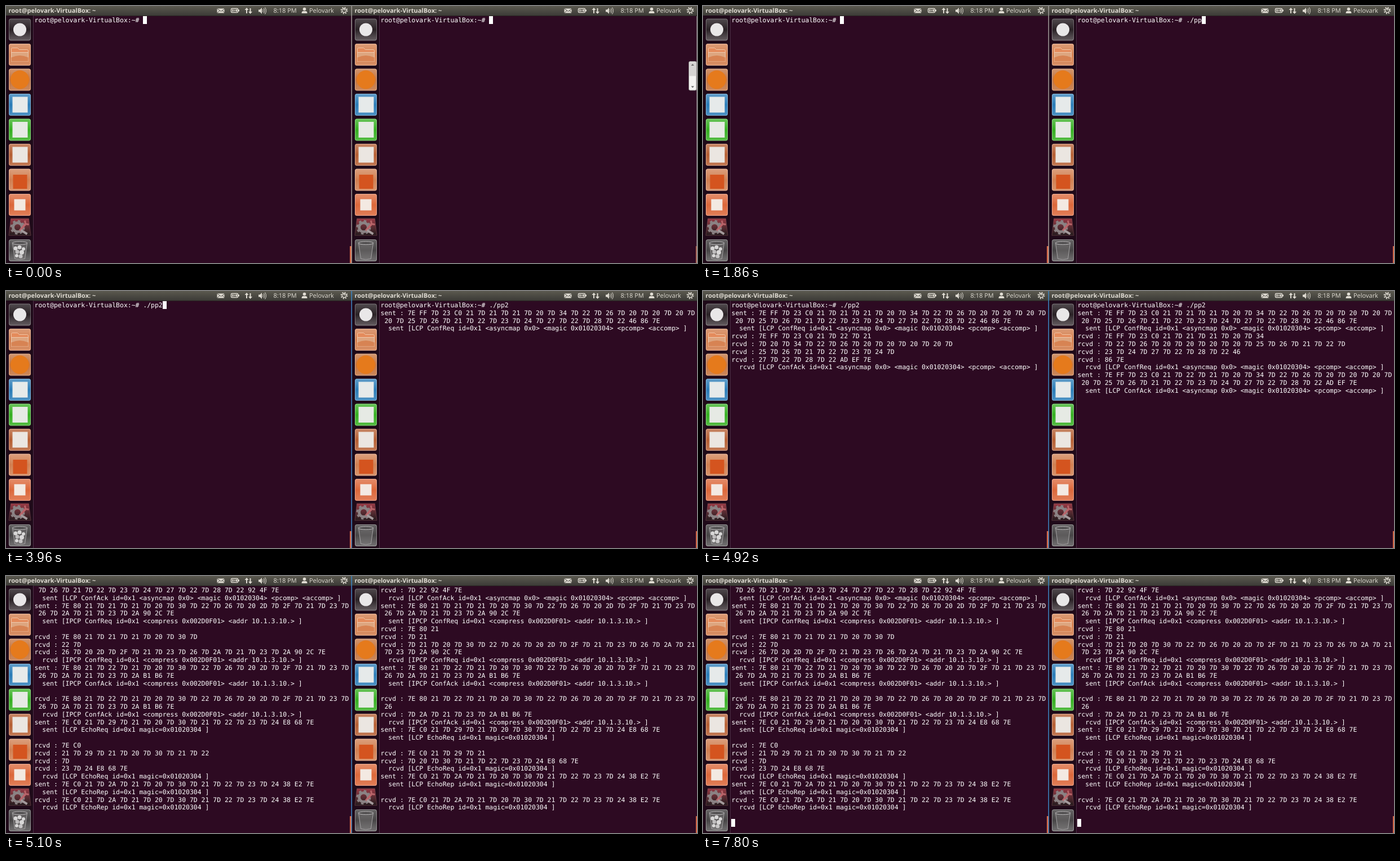
An HTML page that plays this animation: 1226 by 457 pixels, repeating every 8000 ms.

```html
<!DOCTYPE html>
<html lang="en">
<head>
<meta charset="utf-8">
<title>Two terminals</title>
<style>
  html, body { margin: 0; width: 1226px; height: 457px; overflow: hidden; background: #2d0a22; }
  body { position: relative; }
  svg { position: absolute; left: 0; top: 0; display: block; }
  svg text { font: 11px "Open Sans", "Noto Sans", sans-serif; fill: #dfdbd2; text-rendering: geometricPrecision; }
  svg .title { font-weight: 700; }
  pre {
    position: absolute; top: 19px; margin: 0; color: #fff;
    font: 11.44px/13.79px "DejaVu Sans Mono", monospace;
    text-rendering: geometricPrecision; font-variant-ligatures: none;
  }
  .cursor { position: absolute; width: 7px; height: 14px; background: #fff; }
  #thumb { animation: fade 8s steps(1) infinite; }
  @keyframes fade {
    0% { opacity: 1 }
    .75% { opacity: .8 }
    1.5% { opacity: .6 }
    2.25% { opacity: .4 }
    3% { opacity: .2 }
    6.75%, 100% { opacity: 0 }
  }
  #divider { animation: focus 8s steps(1) infinite; }
  @keyframes focus {
    0% { fill: #a09b98 }
    36.75%, 100% { fill: #3c86c4 }
  }
</style>
</head>
<body>
<svg width="1226" height="457" viewBox="0 0 1226 457">
  <defs>
    <linearGradient id="bar" x2="0" y2="1">
      <stop stop-color="#5b594f"/><stop offset="1" stop-color="#3c3b37"/>
    </linearGradient>
    <linearGradient id="dark" x2="0" y2="1">
      <stop stop-color="#231d20"/><stop offset=".5" stop-color="#2c2628"/><stop offset="1" stop-color="#575153"/>
    </linearGradient>
    <linearGradient id="steel" x2="0" y2="1">
      <stop stop-color="#343233"/><stop offset="1" stop-color="#5b595a"/>
    </linearGradient>
    <linearGradient id="fold" x2="0" y2="1">
      <stop stop-color="#9a3a45"/><stop offset=".55" stop-color="#542a30"/><stop offset="1" stop-color="#241a1d"/>
    </linearGradient>
    <linearGradient id="gloss" x2="0" y2="1">
      <stop stop-color="#fff" stop-opacity=".25"/><stop offset=".5" stop-color="#fff" stop-opacity="0"/>
      <stop offset="1" stop-color="#fff" stop-opacity=".15"/>
    </linearGradient>
    <g id="tile">
      <rect x=".5" y=".5" width="39" height="39" rx="3.5"/>
      <rect x="1" y="1" width="38" height="38" rx="3" fill="url(#gloss)" stroke="#fff" stroke-opacity=".38"/>
    </g>

    <g id="launcher">
      <rect y="17" width="48" height="440" fill="#1f0a19"/>
      <rect x="48" y="17" width="1" height="440" fill="#4d3046"/>
      <g transform="translate(4.5 22)">
        <use href="#tile" fill="url(#dark)" opacity=".85"/>
        <circle cx="20" cy="20" r="11.5" fill="#e9e7e8"/>
      </g>
      <g transform="translate(4.5 66.5)">
        <use href="#tile" fill="#d27d4c"/>
        <path d="M5 10q0-2 2-2h9l3 3h14q2 0 2 2v19H5z" fill="#e48b5c" stroke="#f3c6a6"/>
        <path d="M5 16h30v16H5z" fill="#dda57f" stroke="#efc9ae"/>
        <path d="M5 25q15-7 30 0v7H5z" fill="#d78353"/>
      </g>
      <g transform="translate(4.5 111)">
        <use href="#tile" fill="#c4743f"/>
        <circle cx="20" cy="20" r="16.5" fill="#e57a1c"/>
      </g>
      <g transform="translate(4.5 155.5)">
        <use href="#tile" fill="#2b7db8"/>
        <path d="M7 6h27v28H7z" fill="#e6eaea"/>
      </g>
      <g transform="translate(4.5 200)">
        <use href="#tile" fill="#35b021"/>
        <path d="M7 6h27v28H7z" fill="#e6eae4"/>
      </g>
      <g transform="translate(4.5 244.5)">
        <use href="#tile" fill="#b65f33"/>
        <path d="M7 6h27v28H7z" fill="#ebe6e1"/>
      </g>
      <g transform="translate(4.5 289)">
        <use href="#tile" fill="#d18052"/>
        <path d="M8 11h25v25H8z" fill="#d4541f"/>
      </g>
      <g transform="translate(4.5 333.5)">
        <use href="#tile" fill="#dc683b"/>
        <path d="M10 10h20v20H10z" fill="#f3e9e2"/>
      </g>
      <g transform="translate(4.5 377.5)">
        <path d="M4 .5h32l3.5 30h-39z" fill="url(#fold)" stroke="#7b4a50" stroke-opacity=".6"/>
        <circle cx="16" cy="16" r="8" fill="none" stroke="#8b8284" stroke-width="5"/>
        <circle cx="16" cy="16" r="11.5" fill="none" stroke="#8b8284" stroke-width="3" stroke-dasharray="4.5 4.53"/>
        <path d="M20 22L31 9" stroke="#b8656a" stroke-width="4"/>
        <path d="M29 4l1 6 6 1" fill="none" stroke="#b8656a" stroke-width="3"/>
        <path d="M22 21l11 7" stroke="#a49a9c" stroke-width="4"/>
      </g>
      <g transform="translate(4.5 414.5)">
        <use href="#tile" fill="url(#steel)"/>
        <path d="M7 7h26l-4 28q-9 3-18 0z" fill="#7c7a7b" fill-opacity=".4" stroke="#a5a3a4"/>
        <ellipse cx="20" cy="7" rx="13.5" ry="2.5" fill="#4b494a" stroke="#c5c3c4"/>
      </g>
    </g>

    <g id="tray" fill="#dfdbd2">
      <rect x="374.5" y="4.5" width="13" height="8" rx="1"/>
      <path d="M375 5l6.5 4.5L388 5M375 12l4-3.5m9 3.5l-4-3.5" fill="none" stroke="#4b4a44"/>
      <rect x="399.5" y="4.5" width="12" height="7" rx="1.5" fill="none" stroke="#dfdbd2" stroke-width="1.5"/>
      <path d="M412 6.500h2v3h-2zM401.500 6h2v4h-2zM408 6h2v4h-2zM407 5l-3 3.500h2l-1 2.500 3-3.500h-2z"/>
      <path d="M427 3l3.500 4h-2.500v6h-2V7h-2.500zM433.500 14l-3.500-4h2.500V4h2v6h2.500z"/>
      <path d="M448 6.500h2.500L454 3v11l-3.500-3.500H448z"/>
      <path d="M455.500 6q1.500 2.500 0 5m2-7q3 4.500 0 9m2-10.500q4 6 0 12" fill="none" stroke="#dfdbd2"/>
      <text x="474.500" y="12">8:18 PM</text>
      <circle cx="529.500" cy="5.500" r="2.800"/>
      <path d="M524.500 13q0-4 3-4h4q3 0 3 4z"/>
      <text x="538" y="12">Pelovark</text>
    </g>
    <g id="gear" fill="none" stroke="#dfdbd2">
      <circle cx="600" cy="8" r="3.500" stroke-width="1.400"/>
      <circle cx="600" cy="8" r="5.400" stroke-width="2" stroke-dasharray="2 2.240"/>
      <path d="M600 4v4" stroke-width="1.500"/>
    </g>
    <g id="desk">
      <rect width="613" height="17" fill="url(#bar)"/>
      <rect y="17" width="613" height="1" fill="#292422"/>
      <text class="title" x="4.500" y="12">root@pelovark-VirtualBox: ~</text>
      <use href="#launcher"/>
      <use href="#gear"/>
      <rect x="610" y="427" width="3" height="30" fill="#d76a48"/>
    </g>
  </defs>

  <use href="#desk"/>
  <use href="#tray"/>
  <g fill="#d9d8d8">
    <circle cx="17" cy="431" r="3.500"/><circle cx="24" cy="429" r="3.500"/><circle cx="31" cy="432" r="3"/>
    <circle cx="20" cy="437" r="3.500" fill="#bfbdbe"/><circle cx="28" cy="438" r="4"/>
    <circle cx="19" cy="444" r="3"/><circle cx="26" cy="445" r="3.500" fill="#c8c6c7"/>
  </g>
  <use href="#desk" x="614"/>
  <use href="#tray" x="616"/>
  <rect id="divider" x="612.500" width="1.500" height="457"/>
  <g id="thumb">
    <path d="M1225.500 18v439" stroke="#8a8085"/>
    <rect x="1211.500" y="98.500" width="13.500" height="51.500" rx="2.500" fill="#f3f2f1" stroke="#8c8888"/>
    <path d="M1212.500 99.500h12v25h-12z" fill="#d6d4d3"/>
    <path d="M1215.500 106l2.700-3 2.700 3zM1215.500 142.500l2.700 3 2.700-3z" fill="#666"/>
  </g>
</svg>

<script>
const LOOP = 8000, COLS = 81, ROWS = 30, CELL_W = 6.887, CELL_H = 13.79, TOP = 18.4;
const PROMPT = 'root@pelovark-VirtualBox:~# ', COMMAND = './pp2';

// Escaped PPP frames
const lcp = (code, crc, head = 'FF 7D 23 C0 21') =>
  `7E ${head} 7D ${code} 7D 21 7D 20 7D 34 7D 22 7D 26 7D 20 7D 20 7D 20 7D 20 7D 25 ` +
  `7D 26 7D 21 7D 22 7D 23 7D 24 7D 27 7D 22 7D 28 7D 22 ${crc} 7E`;
const ipcp = (code, crc) =>
  `7E 80 21 7D ${code} 7D 21 7D 20 7D 30 7D 22 7D 26 7D 20 2D 7D 2F 7D 21 7D 23 7D ` +
  `26 7D 2A 7D 21 7D 23 7D 2A ${crc} 7E`;
const echo = (code, crc) =>
  `7E C0 21 7D ${code} 7D 21 7D 20 7D 30 7D 21 7D 22 7D 23 7D 24 ${crc} 7E`;

const LCP_OPTS = 'id=0x1 <asyncmap 0x0> <magic 0x01020304> <pcomp> <accomp>';
const IP_OPTS = 'id=0x1 <compress 0x002D0F01> <addr 10.1.3.10.>';
const ECHO_OPTS = 'id=0x1 magic=0x01020304';
const PACKETS = {
  lcpReq: [lcp('21', '46 86'), 'LCP ConfReq ' + LCP_OPTS],
  lcpAck: [lcp('22', 'AD EF'), 'LCP ConfAck ' + LCP_OPTS],
  shortAck: [lcp('22', '92 4F', 'C0 21'), 'LCP ConfAck ' + LCP_OPTS],
  ipReq: [ipcp('21', '90 2C'), 'IPCP ConfReq ' + IP_OPTS],
  ipAck: [ipcp('22', 'B1 B6'), 'IPCP ConfAck ' + IP_OPTS],
  echoReq: [echo('29', 'E8 68'), 'LCP EchoReq ' + ECHO_OPTS],
  echoRep: [echo('2A', '38 E2'), 'LCP EchoRep ' + ECHO_OPTS],
};

// Log lines of one packet, read in chunks of the given byte counts
function packet(dir, name, sizes = [99]) {
  const [hex, info] = PACKETS[name], bytes = hex.split(' '), lines = [];
  for (const n of sizes) {
    const line = `${dir} : ${bytes.splice(0, n).join(' ')}`;
    for (let i = 0; i < line.length; i += COLS) lines.push(line.slice(i, i + COLS));
  }
  return [...lines, `  ${dir} [${info} ]`];
}
const sent = name => packet('sent', name);
const rcvd = (name, ...sizes) => packet('rcvd', name, sizes.length ? sizes : undefined);

const first = [PROMPT + COMMAND, ...sent('lcpReq')];
const leftStart = [...first, ...rcvd('lcpAck', 10, 17, 12, 10)];
const leftEnd = [
  ...leftStart, ...rcvd('lcpReq', 10, 18, 10, 9, 2), ...sent('shortAck'),
  ...sent('ipReq'), '', ...rcvd('ipReq', 12, 2, 23), ...sent('ipAck'), '',
  ...rcvd('ipAck'), ...sent('echoReq'), '', ...rcvd('echoReq', 2, 13, 1, 6),
  ...sent('echoRep'), ...rcvd('echoRep'), '',
];
const rightStart = [...first, ...rcvd('lcpReq', 14, 21, 12, 2), ...sent('lcpAck'), ''];
const rightEnd = [
  ...rightStart, ...rcvd('shortAck', 41, 5), ...sent('ipReq'),
  ...rcvd('ipReq', 3, 2, 32), ...sent('ipAck'), '', ...rcvd('ipAck', 26, 11),
  ...sent('echoReq'), '', ...rcvd('echoReq', 7, 15), ...sent('echoRep'), '',
  ...rcvd('echoRep'), '',
];

const panes = [
  {
    x: 50.5,
    keys: [3420, 3540, 3660, 3780, 3960],
    logs: [[4200, leftStart], [5040, leftEnd.slice(0, -7)], [5100, leftEnd]],
    blinks: [300, 840, 4740, 5280, 5880, 6480, 7020, 7620],
  },
  {
    x: 664.5,
    keys: [1380, 1500, 1680, 1800, 1920],
    logs: [[2100, first], [4200, rightStart], [5040, rightEnd]],
    blinks: [360, 960, 2640, 3240, 3780, 4380, 4920, 5520, 6120, 6660, 7260, 7800],
  },
];

const add = (tag, cls) => {
  const el = document.createElement(tag);
  el.className = cls;
  return document.body.appendChild(el);
};
for (const p of panes) {
  p.text = add('pre', 'log');
  p.text.style.left = p.x + 'px';
  p.cursor = add('div', 'cursor');
}

const passed = (times, t) => times.filter(at => at <= t).length;

function draw(p, t) {
  const step = passed(p.logs.map(l => l[0]), t);
  const typed = PROMPT + COMMAND.slice(0, passed(p.keys, t));
  const lines = step ? p.logs[step - 1][1].slice(-ROWS) : [typed];
  const content = lines.join('\n');
  if (content !== p.shown) p.text.textContent = p.shown = content;
  const col = step ? 0 : typed.length, row = step ? lines.length : 0;
  p.cursor.style.left = Math.round(p.x + col * CELL_W - .1) + 'px';
  p.cursor.style.top = Math.round(TOP + row * CELL_H) + 'px';
  p.cursor.style.visibility = passed(p.blinks, t) % 2 ? 'hidden' : 'visible';
}

const styled = document.getAnimations();
function tick() {
  const t = performance.now() % LOOP;
  for (const a of styled) a.currentTime = t;
  for (const p of panes) draw(p, t);
  requestAnimationFrame(tick);
}
tick();
</script>
</body>
</html>
```
